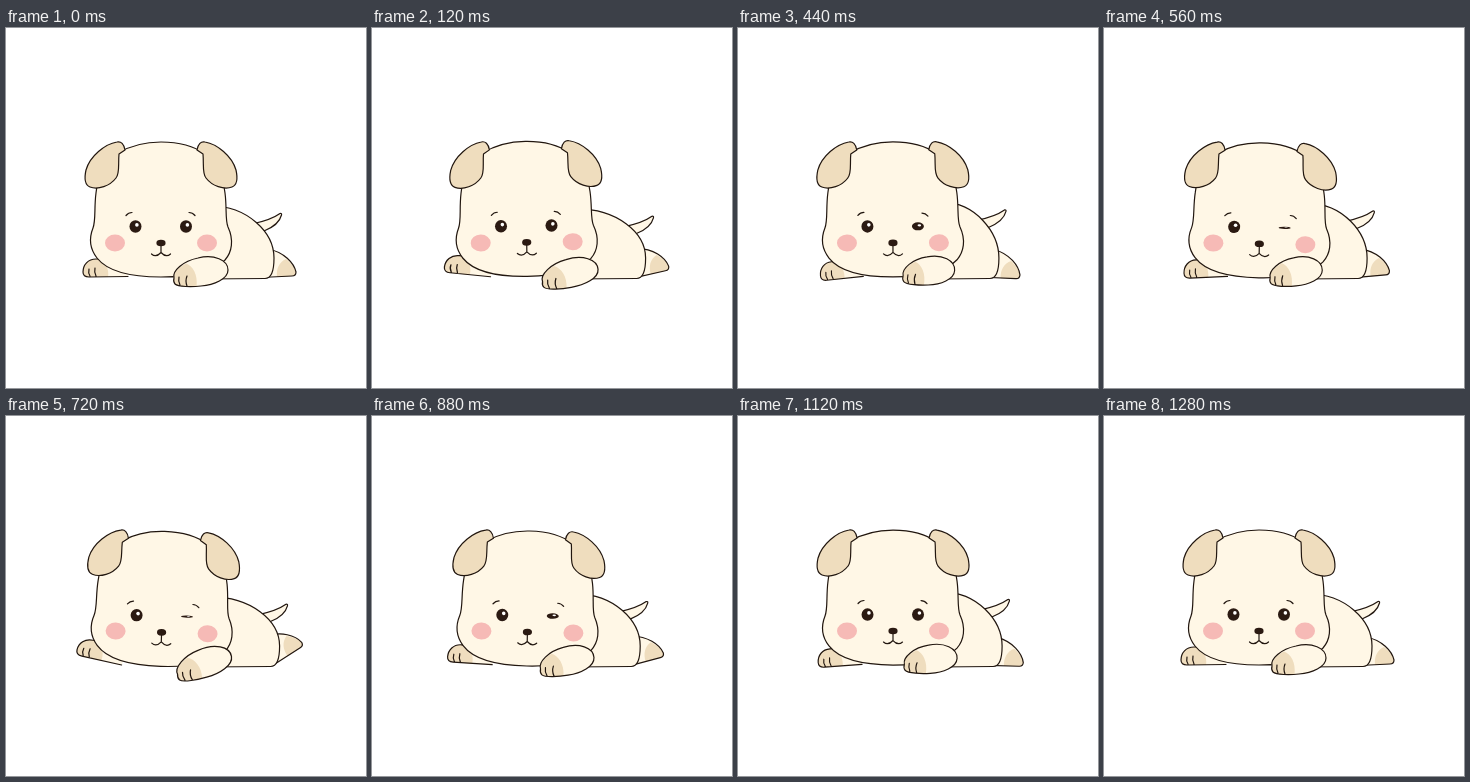
These frames come from a looping animation (360x360 px, 1640 ms). An HTML page:

```html
<!DOCTYPE html>
<html lang="en">
<head>
<meta charset="utf-8">
<title>Resting puppy</title>
<style>
  html, body { margin: 0; width: 100%; height: 100%; overflow: hidden; background: #fff; }
  svg { display: block; width: 100vw; height: 100vh; }
  .fur { fill: #fff7e6; }
  .tan { fill: #efddbe; }
  .line { stroke: #21160f; stroke-width: 1.2; stroke-linecap: round; stroke-linejoin: round; }
  .open { fill: none; }
  .dark { fill: #2b1a12; }
  .blush { fill: #f6bab6; }
</style>
</head>
<body>
<svg viewBox="0 0 360 360">
  <defs>
    <path id="ear" class="tan line" d="M119 122C118 116 115 113 111 114C99 116 84 128 80 142C78 151 79 157 84 159C92 162 104 158 110 150C114 145 112 137 113 126Z"/>
    <g id="eye">
      <ellipse class="dark" rx="6" ry="6.2"/>
      <circle cx="1.4" cy="-1.6" r="1.800" fill="#fff"/>
    </g>
  </defs>

  <g id="tail">
    <path class="fur line" d="M246 196Q265 192 274 185.500Q276 185 275.500 187Q273 197 258 203Z"/>
  </g>

  <g id="foot">
    <path class="fur" d="M262 221C278 224 288 235 290 244Q290 248 286 248L255 249.500Z"/>
    <path class="tan" d="M280 231C286 236 289 240 290 244Q290 248 286 248L271 249C270 241 273 234 280 231Z"/>
    <path class="open line" d="M262 221C278 224 288 235 290 244Q290 248 286 248L255 249.500"/>
  </g>

  <path id="body" class="fur line"/>

  <g id="pawL">
    <path class="fur" d="M110 231L90 231C82 231 77 237 77 244Q77 249 83 249L122 248.500L124 235Z"/>
    <path class="tan" d="M90 231C82 231 77 237 77 244Q77 249 83 249L102 249C103 243 101 238 97 231Z"/>
    <path class="open line" d="M110 231L90 231C82 231 77 237 77 244Q77 249 83 249L122 248.500M83 241Q82 245 84 248M89 240Q88 244 90 248"/>
  </g>

  <g id="head">
    <path class="fur line" d="M155 114C172 114 188 118 199 126C214 138 217 150 219 165C221 180 219 192 222 199C228 212 226 224 219 232C207 245 183 249 155 249C127 249 102 244 91 230C84 221 83 210 87 200C90 192 88 180 90 165C92 146 98 134 112 125C124 118 138 114 155 114Z"/>
    <use href="#ear"/>
    <use href="#ear" transform="translate(310) scale(-1 1)"/>
    <ellipse class="blush" cx="109" cy="215" rx="10" ry="8.500"/>
    <ellipse class="blush" cx="201" cy="215" rx="10" ry="8.500"/>
    <use href="#eye" transform="translate(129.500 198.500)"/>
    <use href="#eye" id="wink"/>
    <path class="open line" d="M120 187.500Q122.500 184.500 126 184.500"/>
    <path id="brow" class="open line" d="M183 184.500Q186.500 184.500 189 187.500"/>
    <ellipse class="dark" cx="155" cy="215" rx="4.600" ry="3.300"/>
    <path class="open line" d="M155 218V224.500M145.500 226Q150 230 155 224.500Q160 230 164.500 226"/>
  </g>

  <g id="pawR">
    <path class="fur" d="M168 250C166 243 177 233 192 230C208 226 222 232 222 242C222 251 208 257 195 258C186 259 172 259 169 256Q167 254 168 250Z"/>
    <path class="tan" d="M168 250C167 245 173 239 180 235.500C187 238 192 247 190.500 258.300C183 259 172 259 169 256Q167 254 168 250Z"/>
    <path class="open line" d="M168 250C166 243 177 233 192 230C208 226 222 232 222 242C222 251 208 257 195 258C186 259 172 259 169 256Q167 254 168 250ZM173 249Q172 253 174 257M181 248Q179 253 181 258"/>
  </g>
</svg>
<script>
  const LOOP = 1640, END = 1280, STEP = 40;

  // Each track is a list of [time, value], eased between entries.
  const tracks = {
    reach: [[0, 0], [240, 14], [480, -10.5], [720, 7], [1040, -6.5], [1280, 0]],
    swing: [[0, 0], [240, -20], [480, 7], [720, -30], [1040, 6], [1280, 0]],
    tilt: [[0, 0], [220, -1.4], [720, 1.75], [1160, 0]],
    lid: [[340, 1], [560, 0.18], [780, 0.18], [1040, 1]]
  };

  const parts = {};
  for (const id of ['tail', 'foot', 'body', 'pawL', 'head', 'wink', 'brow', 'pawR']) {
    parts[id] = document.getElementById(id);
  }

  function sample(track, t) {
    if (t <= track[0][0]) return track[0][1];
    for (let i = 1; i < track.length; i++) {
      const [t0, a] = track[i - 1], [t1, b] = track[i];
      if (t <= t1) return a + (b - a) * (1 - Math.cos(Math.PI * (t - t0) / (t1 - t0))) / 2;
    }
    return track[track.length - 1][1];
  }

  // Shift a part, then turn and lengthen it about its pivot.
  function move(name, x, y, angle = 0, px = 0, py = 0, stretch = 1) {
    parts[name].setAttribute('transform',
      `translate(${x + px} ${y + py}) rotate(${angle}) scale(${stretch} 1) translate(${-px} ${-py})`);
  }

  function bodyPath(dx, dy) {
    const right = 268 + dx, top = 178 + dy;
    return `M205 ${top}C${241 + 0.6 * dx} ${top} ${right} 204 ${right} 230` +
      `C${right} 242 ${right - 2} 250.500 ${right - 9} 250.500L200 251Z`;
  }

  function draw(t) {
    const reach = sample(tracks.reach, t);
    const swing = sample(tracks.swing, t);
    const lid = sample(tracks.lid, t);
    const dx = 0.8 * reach, dy = 0.4 * reach;
    const stretch = 1 + 0.006 * reach;

    parts.body.setAttribute('d', bodyPath(dx, dy));
    move('tail', 0.85 * reach, dy);
    move('foot', dx, 0, swing, 257, 235);
    move('pawL', 0.14 * swing - 0.3 * reach, 0, 0.4 * reach - 0.35 * swing, 120, 248, stretch);
    move('pawR', 0.45 * reach, 0.05 * reach - 0.1 * swing, 0.3 * swing - 0.2 * reach, 195, 244, stretch);
    move('head', 0, 0, sample(tracks.tilt, t), 109, 235);
    move('brow', 3 * (1 - lid), 2 * (1 - lid));
    parts.wink.setAttribute('transform', `translate(180 198.500) scale(1 ${lid})`);
  }

  const start = performance.now();
  function tick() {
    const t = (performance.now() - start) % LOOP;
    draw(Math.min(END, Math.floor(t / STEP) * STEP));
    requestAnimationFrame(tick);
  }
  draw(0);
  requestAnimationFrame(tick);
</script>
</body>
</html>
```
